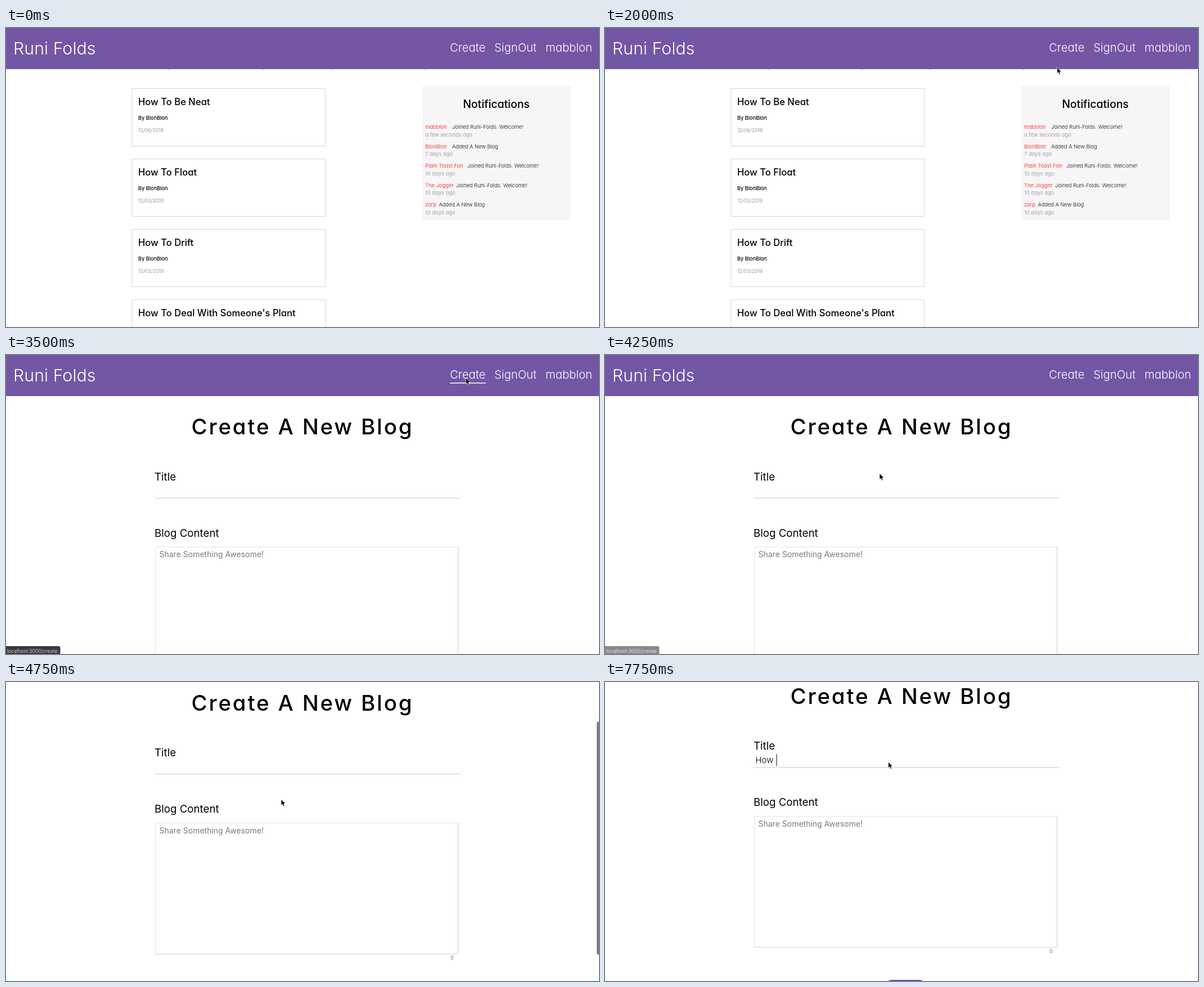
These frames come from a looping animation (1054x531 px, 8 s). An HTML page:

```html
<!DOCTYPE html>
<html lang="en">
<head>
<meta charset="utf-8">
<title>Runi Folds</title>
<style>
  html, body { margin: 0; width: 100%; height: 100%; overflow: hidden; background: #fff; }
  svg { display: block; width: 1054px; height: 531px; }
  text { font-family: Inter, sans-serif; font-feature-settings: "cv11"; white-space: pre; }
  .plain { font-feature-settings: normal; }
  .brand { font-size: 30.4px; font-weight: 300; fill: #fff; }
  .nav { font-size: 20.3px; font-weight: 300; fill: #fff; }
  .card { fill: #fff; stroke: #d6d6d8; }
  .title { font-size: 16.6px; font-weight: 500; }
  .author { font-size: 9.2px; font-weight: 500; }
  .date { font-size: 8.6px; fill: #999; }
  .panel { font-size: 19.4px; font-weight: 500; text-anchor: middle; }
  .note { font-size: 9.3px; font-weight: 300; fill: #111; }
  .user { font-size: 9.3px; fill: #f0483c; }
  .ago { font-size: 9.3px; fill: #a0a0a2; }
  .heading { font-size: 38.4px; font-weight: 500; letter-spacing: 2.85px; }
  .label { font-size: 18.7px; }
  .hint { font-size: 14px; fill: #7a7a7a; }
  .typed { font-size: 15px; font-weight: 300; }
  .count { font-size: 9.5px; fill: #777; }
  .status { font-size: 8.6px; fill: #d0d0d0; }
</style>
</head>
<body>
<svg viewBox="0 0 1054 531">
  <g id="home"></g>
  <g id="page">
    <rect width="1054" height="73" fill="#7356a4"/>
    <text class="brand" x="13" y="47">Runi Folds</text>
    <text class="nav" x="789" y="41.5">Create</text>
    <text class="nav" x="868" y="41.5">SignOut</text>
    <text class="nav" x="1042" y="41.5" text-anchor="end">mabblon</text>
    <rect id="underline" x="789" y="49" width="64" height="1.5" fill="#fff"/>
    <g id="form">
      <text class="heading" x="329.5" y="141">Create A New Blog</text>
      <text class="label" x="264" y="222.5">Title</text>
      <text id="typed" class="typed" x="267.5" y="246.5"></text>
      <rect id="caret" y="230.5" width="1" height="21"/>
      <rect x="264.5" y="253.5" width="543.5" height="1" fill="#cbcbcb"/>
      <text class="label" x="264" y="322.5">Blog Content</text>
      <path d="M265.5 574V341H803" fill="none" stroke="#e2e2e2"/>
      <path d="M265 573.5H803.5V340.5" fill="none" stroke="#cfcfcf"/>
      <text class="hint plain" x="272.5" y="359">Share Something Awesome!</text>
      <text class="count" x="790" y="583.5">0</text>
      <rect x="500" y="631.5" width="68" height="34" rx="9" fill="#6a4ba3"/>
    </g>
  </g>
  <rect id="bar" x="1050" width="8" height="414" rx="4" fill="#7d7d7d"/>
  <g id="status">
    <path d="M0 517H93a3.5 3.5 0 0 1 3.5 3.5V531H0z" fill="#3b3b3e"/>
    <text class="status plain" x="2" y="528.5">localhost:3000/create</text>
  </g>
  <path id="cursor" d="M0 0V10.8L2.4 8.6 4.2 12.5 6 11.7 4.4 7.9 7.6 7.6z" stroke="#fff" stroke-width=".7"/>
</svg>
<script>
const $ = id => document.getElementById(id);
const text = (cls, x, y, str) => `<text class="${cls}" x="${x}" y="${y}">${str}</text>`;

const blogs = [
  ["How To Be Neat", "12/06/2019"],
  ["How To Float", "12/03/2019"],
  ["How To Drift", "12/03/2019"],
  ["How To Deal With Someone's Plant", "12/03/2019"],
];
const joined = "Joined Runi-Folds. Welcome!", added = "Added A New Blog";
// user, x of message, message, age
const notes = [
  ["mabblon", 793, joined, "a few seconds ago"],
  ["BlonBlon", 793, added, "7 days ago"],
  ["Plain Toast Fan", 820, joined, "10 days ago"],
  ["The Jogger", 800, joined, "10 days ago"],
  ["zorp", 769.5, added, "10 days ago"],
];

$("home").innerHTML =
  [289, 455, 577, 742].map(x => `<rect x="${x}" y="73" width="3" height="1" fill="#bbb"/>`).join("") +
  blogs.map(([title, date], i) => {
    const y = 107 + i * 125;
    return `<rect class="card" x="224" y="${y + .5}" width="343.5" height="102"/>` +
      text("title", 235, y + 30, title) +
      text("author", 235, y + 55.5, "By BlonBlon") +
      text("date", 235, y + 78, date);
  }).join("") +
  `<rect x="740" y="103" width="264" height="238" fill="#f7f5f8"/>` +
  text("panel", 871.5, 142, "Notifications") +
  notes.map(([user, x, message, age], i) => {
    const y = 179 + i * 34.5;
    return text("user", 745, y, user) + text("note", x, y, message) + text("ago", 745, y + 13.5, age);
  }).join("");

// Stepped tracks: [time, ...values]
const pointer = [
  [0, -50, -50], [500, 850, -4], [750, 850, 5], [1000, 844, 17], [1250, 833, 29], [1500, 822, 39],
  [1750, 812, 57], [2000, 803.5, 70], [2250, 790, 74], [2500, 800, 60], [2750, 817.5, 41],
  [4000, 600, 150], [4250, 488, 210.5], [4750, 489, 208.5], [5250, 497, 172], [5500, 503.5, 142],
];
const scroll = [[0, 0], [4500, 38], [4750, 90.5], [5000, 102.5]];
const scrollbar = [[0, 0], [4500, 1], [5250, .5], [5500, 0]];
const statusFade = [[0, 0], [3000, 1], [4250, .6], [4500, 0]];
const caretX = [268.5, 280.5, 289.5, 301, 304.5];

const at = (track, t) => track.findLast(key => key[0] <= t).slice(1);
const show = (id, on) => $(id).style.display = on ? "" : "none";

function draw() {
  const t = performance.now() % 8000;
  const [x, y] = at(pointer, t), [top] = at(scroll, t);
  const letters = Math.max(0, Math.min(4, Math.floor((t - 6750) / 250)));

  show("home", t < 3500);
  show("form", t >= 3500);
  show("underline", t >= 3000 && t < 4000);
  show("caret", t >= 5750 && t < 6250 || t >= 6750);
  $("typed").textContent = "How ".slice(0, letters);
  $("caret").setAttribute("x", caretX[letters]);
  $("page").setAttribute("transform", `translate(0 ${-top})`);
  $("bar").setAttribute("y", top * .775);
  $("bar").setAttribute("opacity", at(scrollbar, t));
  $("status").setAttribute("opacity", at(statusFade, t));
  $("cursor").setAttribute("transform", `translate(${x} ${y})`);
  requestAnimationFrame(draw);
}
draw();
</script>
</body>
</html>
```
